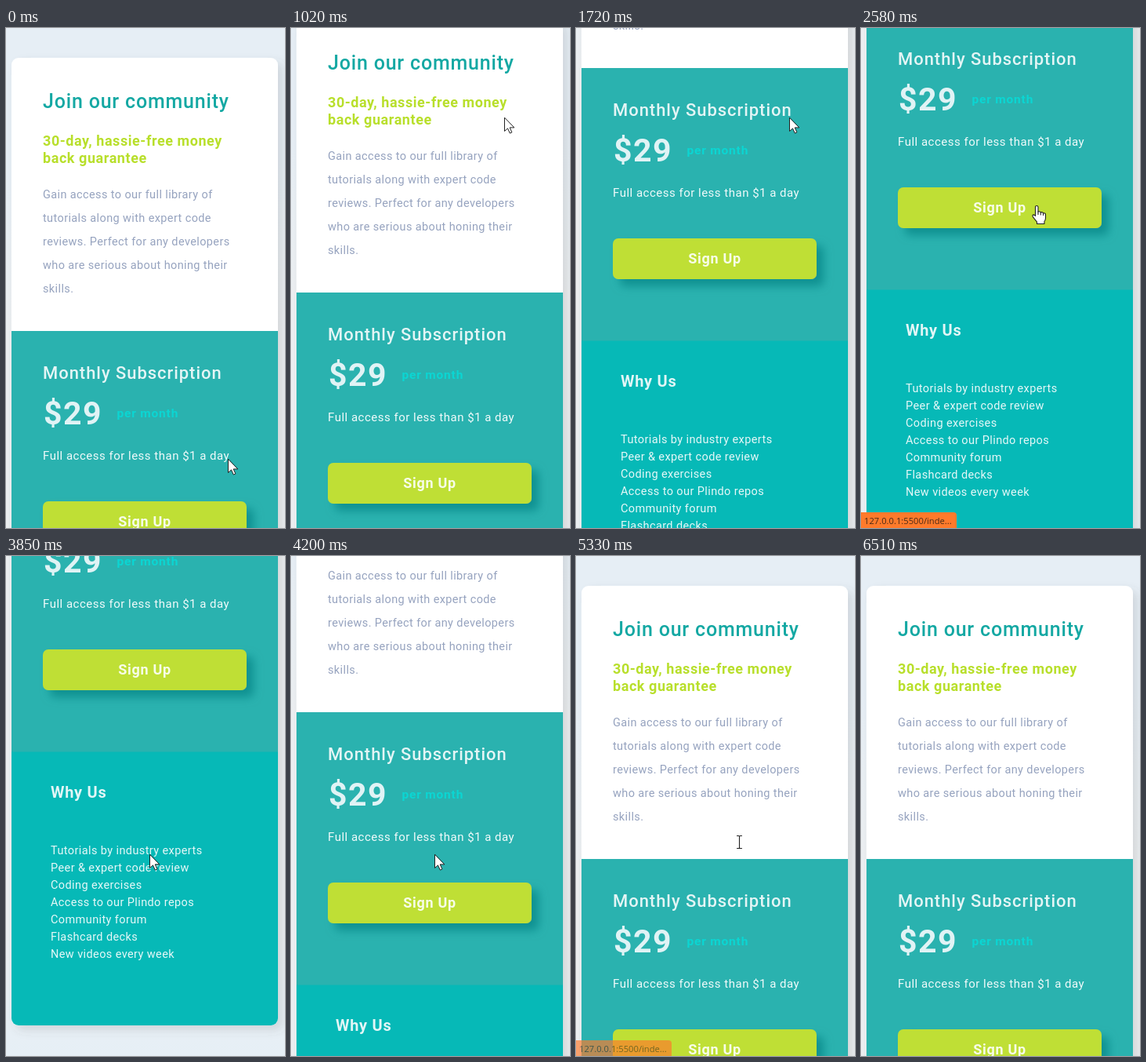
An HTML page for the animation above (6570 ms loop, 356 by 637 pixels).

```html
<!DOCTYPE html>
<html lang="en">
<head>
<meta charset="utf-8">
<title>Subscription card</title>
<style>
  html, body { margin: 0; width: 100%; height: 100%; overflow: hidden; background: #e6eef5; }
  svg { display: block; width: 100vw; height: 100vh; font-family: Roboto, Inter, sans-serif; cursor: default; }
  .title { font-size: 25px; font-weight: 500; letter-spacing: .8px; fill: #14a8a3; }
  .lead { font-size: 18px; font-weight: 600; letter-spacing: .56px; fill: #b8df2b; }
  .body { font-size: 14.5px; letter-spacing: .38px; fill: #96a3bf; }
  .plan { font-size: 22px; font-weight: 500; letter-spacing: .95px; fill: #e4f5f5; }
  .price { font-size: 41px; font-weight: 700; letter-spacing: 1.5px; fill: #e0f3f5; }
  .per { font-size: 15.5px; font-weight: 600; letter-spacing: .8px; fill: #0bd6d3; }
  .note { font-size: 15px; letter-spacing: .5px; fill: #f0fafa; }
  .cta { font-size: 18px; font-weight: 700; letter-spacing: .7px; fill: #f7fce8; }
  .why { font-size: 20px; font-weight: 600; letter-spacing: .7px; fill: #e2f6f6; }
  .item { font-size: 14.5px; letter-spacing: .4px; fill: #e6f8f8; }
  .url { font: 11.2px "Open Sans", sans-serif; fill: #4a2a18; }
</style>
</head>
<body>
<svg viewBox="0 0 356 637" preserveAspectRatio="none">
  <defs>
    <linearGradient id="bg" x1="0" y1="0" x2="0" y2="1">
      <stop offset="0" stop-color="#e6eef5"/>
      <stop offset=".15" stop-color="#e6eef5"/>
      <stop offset=".35" stop-color="#eceff1"/>
      <stop offset=".85" stop-color="#eceff1"/>
      <stop offset="1" stop-color="#e6eff6"/>
    </linearGradient>
    <filter id="cardShadow" x="-10%" y="-5%" width="120%" height="110%">
      <feDropShadow dx="6" dy="6" stdDeviation="6" flood-color="#555" flood-opacity=".16"/>
    </filter>
    <filter id="ctaShadow" x="-20%" y="-50%" width="140%" height="220%">
      <feDropShadow dx="9" dy="9" stdDeviation="6" flood-color="#007f80" flood-opacity=".65"/>
    </filter>
    <clipPath id="cardClip"><rect x="7" y="38" width="340" height="1044" rx="9"/></clipPath>
  </defs>
  <g id="page">
    <rect width="356" height="1124" fill="url(#bg)"/>
    <rect x="7" y="38" width="340" height="1044" rx="9" fill="#fff" filter="url(#cardShadow)"/>
    <g clip-path="url(#cardClip)">
      <rect x="7" y="386" width="340" height="348" fill="#2ab2af"/>
      <rect x="7" y="733.5" width="340" height="350" fill="#06b9b7"/>
    </g>
    <rect x="47" y="603" width="260" height="52" rx="7" fill="#bfdf34" filter="url(#ctaShadow)"/>
    <g id="copy"></g>
  </g>
  <g id="status">
    <path d="M0 617H118Q122 617 122 621V637H0Z" fill="#ff7a2b"/>
    <text class="url" x="4" y="631.5">127.0.0.1:5500/inde...</text>
  </g>
  <g id="cursor" stroke-linejoin="round" stroke-linecap="round">
    <path id="arrow" d="M0 0V17L4 13.4L6.8 19.6L9.4 18.4L6.7 12.4H12Z" fill="#fff" stroke="#222" stroke-width="1"/>
    <g id="hand" fill="#fff" stroke="#222" stroke-width="1.1">
      <path d="M-2 1.6Q-2 0 -.3 0T1.5 1.6V7.6Q4 6.6 4.8 8.4Q7.2 7.6 8 9.4Q11.2 8.8 11 12V16Q10.8 18.4 9.4 20V23H0V20.6L-5 14.4Q-6.4 11.8 -4.4 11.4Q-3.2 11.4 -2 13Z"/>
      <path d="M1.5 7.6V11M4.8 8.4V11.4M8 9.4V12" fill="none"/>
    </g>
    <path id="beam" d="M-3-8H-1Q0-8 0-7Q0-8 1-8H3M0-7V7M-3 8H-1Q0 8 0 7Q0 8 1 8H3" fill="none" stroke="#222" stroke-width="1.1"/>
  </g>
</svg>
<script>
const LOOP = 6570;
const $ = id => document.getElementById(id);

function addText(cls, x, y, lines, leading = 0, anchor = "start") {
  [].concat(lines).forEach((line, i) => {
    const el = document.createElementNS("http://www.w3.org/2000/svg", "text");
    el.setAttribute("class", cls);
    el.setAttribute("x", x);
    el.setAttribute("y", y + i * leading);
    el.setAttribute("text-anchor", anchor);
    el.textContent = line;
    $("copy").append(el);
  });
}

addText("title", 47, 102, "Join our community");
addText("lead", 47, 149.5, ["30-day, hassie-free money", "back guarantee"], 22);
addText("body", 47, 216.5, [
  "Gain access to our full library of",
  "tutorials along with expert code",
  "reviews. Perfect for any developers",
  "who are serious about honing their",
  "skills."
], 30);
addText("plan", 47, 446.5, "Monthly Subscription");
addText("price", 48, 505, "$29");
addText("per", 141.5, 496, "per month");
addText("note", 47, 549.5, "Full access for less than $1 a day");
addText("cta", 177, 635, "Sign Up", 0, "middle");
addText("why", 57, 792, "Why Us");
addText("item", 57, 863.5, [
  "Tutorials by industry experts",
  "Peer & expert code review",
  "Coding exercises",
  "Access to our Plindo repos",
  "Community forum",
  "Flashcard decks",
  "New videos every week"
], 22);

const linear = p => p;
const easeIn = p => p ** 1.4;
const smooth = p => p * p * (3 - 2 * p);
const sharp = p => p < .5 ? .5 * (2 * p) ** 3.5 : 1 - .5 * (2 - 2 * p) ** 3.5;

// Each move: first step, last step, number of steps, end value, easing
const scroll = [
  [880, 1530, 11, 300, easeIn],
  [1620, 1904, 5, 400, smooth],
  [2930, 3140, 4, 487, linear],
  [3850, 4200, 6, 187, sharp],
  [4750, 5330, 9, 0, smooth]
];
const pointer = [
  [280, 610, 6, [272, 114], smooth],
  [1905, 2260, 6, [224, 226], smooth],
  [2580, 2650, 2, [183, 380], p => p < 1 ? 0 : 1],
  [4480, 4610, 3, [205, 440], smooth],
  [4895, 5112, 4, [208, 364], smooth],
  [5410, 5730, 6, [376, 580], smooth]
];
const status = [
  [2190, 2260, 2, 1, linear],
  [2930, 3140, 4, 0, linear],
  [4750, 4822, 2, 1, linear],
  [5330, 5470, 3, 0, linear]
];
const shapes = [[0, "arrow"], [2190, "hand"], [2650, "arrow"], [4545, "hand"], [4967, "beam"]];

function valueAt(moves, start, t, axis) {
  let v = start;
  for (const [from, to, steps, end, ease] of moves) {
    if (t < from) break;
    const step = Math.floor((t - from) * (steps - 1) / (to - from) + 1e-6) + 1;
    const goal = axis === undefined ? end : end[axis];
    v += (goal - v) * ease(Math.min(1, step / steps));
  }
  return v;
}

function render(t) {
  const x = valueAt(pointer, 283, t, 0);
  const y = valueAt(pointer, 549, t, 1);
  const shape = shapes.filter(([from]) => t >= from).pop()[1];
  $("page").setAttribute("transform", `translate(0 ${-Math.round(valueAt(scroll, 0, t))})`);
  $("status").setAttribute("opacity", valueAt(status, 0, t));
  $("cursor").setAttribute("transform", `translate(${Math.round(x) + .5} ${Math.round(y) + .5})`);
  for (const id of ["arrow", "hand", "beam"]) {
    $(id).setAttribute("display", id === shape ? "inline" : "none");
  }
}

const began = performance.now();
function tick() {
  render((performance.now() - began) % LOOP);
  requestAnimationFrame(tick);
}
tick();
</script>
</body>
</html>
```
